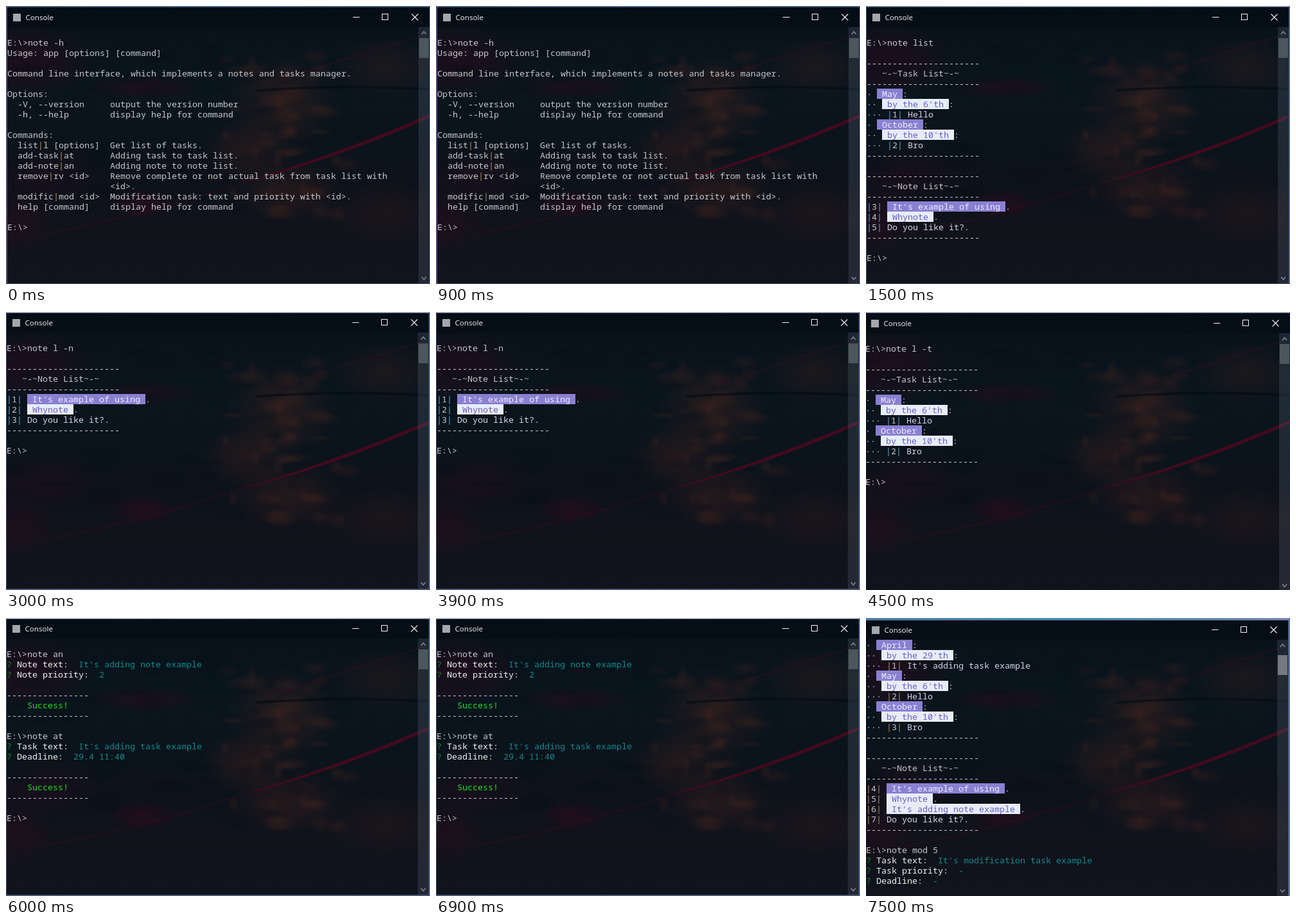
An HTML page with a canvas for the animation above (8000 ms loop, 660 by 434 pixels).

```html
<!DOCTYPE html>
<html lang="en">
<head>
<meta charset="utf-8">
<title>Console</title>
<style>
  html, body { margin: 0; width: 100%; height: 100%; overflow: hidden; background: #0b131a; }
  canvas { display: block; width: 660px; height: 434px; }
</style>
</head>
<body>
<canvas id="stage" width="660" height="434"></canvas>
<script>
const W = 660, H = 434, LOOP = 8000, HOLD = 1500;
const COL = 8, ROW = 16;
const MONO = '13.333px "Noto Sans Mono", "DejaVu Sans Mono", monospace';
const ctx = document.getElementById('stage').getContext('2d');

// Inline styles: {p text} and so on; p and w also fill their cells.
const STYLES = {
  p: { ink: '#eeedfb', fill: '#8a80d2' },
  w: { ink: '#6a5cc8', fill: '#e6edf7' },
  q: { ink: '#16861c' },
  b: { ink: '#f2f2f2' },
  t: { ink: '#138a8e' },
  s: { ink: '#19e31c' },
  l: { ink: '#d3d5ea' }
};

const rule = n => '-'.repeat(n);
const heading = name => [rule(22), `   ~-~${name} List~-~`, rule(22)];
const task = (month, day, id, text) =>
  [`· {p ${month} }:`, `·· {w by the ${day}'th }:`, `··· |${id}| {l${text}}`];
const note = (id, style, text) =>
  style === 'l' ? `|${id}| {l${text}.}` : `|${id}| {${style} ${text} }.`;
const ask = (label, answer) => `{q?} {b${label}:}  {t${answer}}`;
const success = [rule(16), '    {sSuccess!}', rule(16)];

const tasks = [...heading('Task'),
  ...task('May', 6, 1, 'Hello'), ...task('October', 10, 2, 'Bro'), rule(22)];
const notes = first => [...heading('Note'),
  note(first, 'p', "It's example of using"),
  note(first + 1, 'w', 'Whynote'),
  note(first + 2, 'l', 'Do you like it?'), rule(22)];

const TAN = '#bd9468', BLUE = '#62a9d6';

// x, y: first text cell; right: shift of the right-hand controls.
const screens = [
  { x: 2, y: 33, right: 0, rim: 1, sky: ['#4f6fa5', '#3a88b4', '#44699c'], bar: TAN, lines: [
    '', 'E:\\>note -h', 'Usage: app [options] [command]', '',
    'Command line interface, which implements a notes and tasks manager.', '',
    'Options:',
    '  -V, --version     output the version number',
    '  -h, --help        display help for command', '',
    'Commands:',
    '  list|l [options]  Get list of tasks.',
    '  add-task|at       Adding task to task list.',
    '  add-note|an       Adding note to note list.',
    '  remove|rv <id>    Remove complete or not actual task from task list with',
    '                    <id>.',
    '  modific|mod <id>  Modification task: text and priority with <id>.',
    '  help [command]    display help for command', '', 'E:\\>'] },
  { x: 1, y: 33, right: -1, rim: 1, sky: ['#7d9db8', '#9cc0d0', '#a9b9c8'], bar: BLUE,
    lines: ['', 'E:\\>note list', '', ...tasks, '', ...notes(3), '', 'E:\\>'] },
  { x: 1, y: 32, right: -1, rim: 1, sky: ['#c3ced8', '#d5dee4', '#b9c8d4'], bar: BLUE,
    lines: ['', 'E:\\>note l -n', '', ...notes(1), '', 'E:\\>'] },
  { x: -1, y: 33, right: 1, rim: 1, low: 2, sky: ['#c6d0d8', '#d8e0e4', '#c2ccd4'], bar: BLUE,
    lines: ['', 'E:\\>note l -t', '', ...tasks, '', 'E:\\>'] },
  { x: 1, y: 32, right: -1, rim: 1, sky: ['#d6e0e6', '#e4eaee', '#cfdae2'], bar: BLUE, lines: [
    '', 'E:\\>note an',
    ask('Note text', "It's adding note example"), ask('Note priority', '2'), '',
    ...success, '', 'E:\\>note at',
    ask('Task text', "It's adding task example"), ask('Deadline', '29.4 11:40'), '',
    ...success, '', 'E:\\>'] },
  { x: 0, y: 34, right: -2, rim: 3, scroll: 7, thumb: '#757981',
    sky: ['#4f7fb0', '#3f8fba', '#7c86b8'], bar: TAN, lines: [
    ...task('April', 29, 1, "It's adding task example"),
    ...task('May', 6, 2, 'Hello'), ...task('October', 10, 3, 'Bro'), rule(22), '',
    ...heading('Note'),
    note(4, 'p', "It's example of using"), note(5, 'w', 'Whynote'),
    note(6, 'w', "It's adding note example"), note(7, 'l', 'Do you like it?'),
    rule(22), '', 'E:\\>note mod 5',
    ask('Task text', "It's modification task example"),
    ask('Task priority', '-'), ask('Deadline', '-')] }
];

function rect(c, color, x, y, w, h) {
  c.fillStyle = color;
  c.fillRect(x, y, w, h);
}

function glow(c, rgb, alpha, x, y, rx, ry) {
  c.save();
  c.translate(x, y);
  c.scale(rx, ry);
  const g = c.createRadialGradient(0, 0, 0, 0, 0, 1);
  g.addColorStop(0, `rgba(${rgb},${alpha})`);
  g.addColorStop(0.5, `rgba(${rgb},${alpha * 0.6})`);
  g.addColorStop(1, `rgba(${rgb},0)`);
  c.fillStyle = g;
  c.fillRect(-1, -1, 2, 2);
  c.restore();
}

function curve(c, color, width, x0, y0, cx, cy, x1, y1) {
  c.strokeStyle = color;
  c.lineWidth = width;
  c.beginPath();
  c.moveTo(x0, y0);
  c.quadraticCurveTo(cx, cy, x1, y1);
  c.stroke();
}

// Soft dusk tones showing through the translucent window.
function makeBackdrop() {
  const canvas = document.createElement('canvas');
  canvas.width = W;
  canvas.height = H;
  const c = canvas.getContext('2d');
  const g = c.createLinearGradient(0, 0, 0, H);
  g.addColorStop(0, '#07111a');
  g.addColorStop(0.3, '#09151d');
  g.addColorStop(0.65, '#0c121a');
  g.addColorStop(0.8, '#11131b');
  g.addColorStop(1, '#11131d');
  rect(c, g, 0, 0, W, H);

  const wine = '52,8,30', brown = '62,32,28';
  glow(c, wine, 0.5, 30, 85, 110, 60);
  glow(c, wine, 0.45, 215, 127, 95, 20);
  glow(c, wine, 0.5, 212, 308, 55, 24);
  glow(c, wine, 0.35, 15, 335, 60, 50);
  glow(c, wine, 0.3, 60, 265, 100, 45);
  glow(c, brown, 0.5, 430, 150, 85, 75);
  glow(c, brown, 0.45, 375, 225, 70, 50);
  glow(c, brown, 0.45, 440, 285, 90, 50);
  glow(c, brown, 0.35, 590, 95, 85, 50);
  glow(c, brown, 0.25, 590, 320, 90, 50);

  let seed = 11;
  const rnd = () => (seed = seed * 16807 % 2147483647) / 2147483647;
  for (let i = 0; i < 70; i++) {
    const tone = rnd() < 0.6 ? '70,36,30' : '7,16,24';
    glow(c, tone, 0.3, 340 + rnd() * 190, 75 + rnd() * 250, 8 + rnd() * 22, 5 + rnd() * 11);
  }
  for (let i = 0; i < 25; i++) {
    glow(c, '5,14,21', 0.4, rnd() * 330, 60 + rnd() * 260, 15 + rnd() * 35, 5 + rnd() * 12);
  }

  curve(c, 'rgba(5,12,18,.65)', 4, 390, 132, 520, 122, 660, 130);
  curve(c, 'rgba(70,12,32,.5)', 1.5, 425, 116, 530, 82, 655, 44);
  curve(c, 'rgba(68,8,30,.55)', 1.5, 60, 356, 220, 325, 350, 281);
  c.fillStyle = '#420a1d';
  c.beginPath();
  c.moveTo(660, 169);
  c.quadraticCurveTo(500, 238, 345, 282);
  c.quadraticCurveTo(510, 242, 660, 174);
  c.fill();
  return canvas;
}

function drawLine(line, x, y, bar) {
  let col = 0;
  for (const part of line.match(/\{[^}]+\}|\||[^{|]+/g) || []) {
    const style = part[0] === '{' ? STYLES[part[1]] : { ink: part === '|' ? bar : '#c6c8ca' };
    const text = part[0] === '{' ? part.slice(2, -1) : part;
    const left = x + col * COL;
    if (style.fill) rect(ctx, style.fill, left, y, text.length * COL, ROW);
    ctx.fillStyle = style.ink;
    ctx.fillText(text, left, y + 13);
    col += text.length;
  }
}

function stroke(color, width, ...paths) {
  ctx.strokeStyle = color;
  ctx.lineWidth = width;
  ctx.beginPath();
  for (const path of paths) path.forEach(([x, y], i) => i ? ctx.lineTo(x, y) : ctx.moveTo(x, y));
  ctx.stroke();
}

function drawTitle(s) {
  const mid = s.y - 15.5, r = s.right + 0.5;
  rect(ctx, 'rgba(2,6,12,.3)', 0, 0, W, s.y);
  rect(ctx, '#a3a7ab', s.x + 9, s.y - 21, 12, 12);
  ctx.font = '11.6px "Open Sans", "Noto Sans", sans-serif';
  ctx.fillStyle = '#f4f4f4';
  ctx.fillText('Console', s.x + 28.5, s.y - 11);
  stroke('#f4f4f4', 1, [[540 + r - 0.5, mid], [550 + r, mid]]);
  ctx.strokeRect(585 + r, mid - 5, 9, 9);
  stroke('#f4f4f4', 1.1,
    [[631 + r, mid - 5], [641 + r, mid + 5]], [[641 + r, mid - 5], [631 + r, mid + 5]]);
}

function drawScrollbar(s) {
  const x = 642 + s.right, mid = x + 8.5, low = s.y + 392 + (s.low || 0);
  rect(ctx, 'rgba(150,160,190,.15)', x, s.y, 17, H - s.y);
  rect(ctx, s.thumb || '#4c575d', x + 1, s.y + 17 + (s.scroll || 0), 15, 31);
  const chevron = (y, d) => [[mid - 3.5, y - 2 * d], [mid, y + 2 * d], [mid + 3.5, y - 2 * d]];
  stroke('#82878d', 1.5, chevron(s.y + 9, -1), chevron(low, 1));
}

function drawEdges(s) {
  const sky = ctx.createLinearGradient(0, 0, W, 0);
  s.sky.forEach((color, i) => sky.addColorStop(i / 2, color));
  const left = s.x - 1, right = 659 + s.right, bottom = s.y + 400;
  const edge = '#4a5570';
  rect(ctx, sky, 0, 0, W, s.rim);
  rect(ctx, edge, 0, s.rim, W, 1);
  rect(ctx, edge, left, s.rim, 1, H);
  rect(ctx, edge, right, s.rim, 1, H);
  if (left > 0) rect(ctx, '#6d4a86', 0, 0, left, H);
  if (right < W - 1) rect(ctx, '#5c76a6', right + 1, 0, W - right, H);
  if (!s.low) rect(ctx, edge, 0, bottom, W, H - bottom);
}

const backdrop = makeBackdrop();

function drawScreen(s) {
  ctx.drawImage(backdrop, 0, 0);
  drawTitle(s);
  drawScrollbar(s);
  ctx.font = MONO;
  s.lines.forEach((line, i) => drawLine(line, s.x, s.y + i * ROW, s.bar));
  drawEdges(s);
}

const start = performance.now();
let shown = -1;
function tick() {
  const index = Math.floor((performance.now() - start) % LOOP / HOLD);
  if (index !== shown) drawScreen(screens[shown = index]);
  requestAnimationFrame(tick);
}
tick();
</script>
</body>
</html>
```
